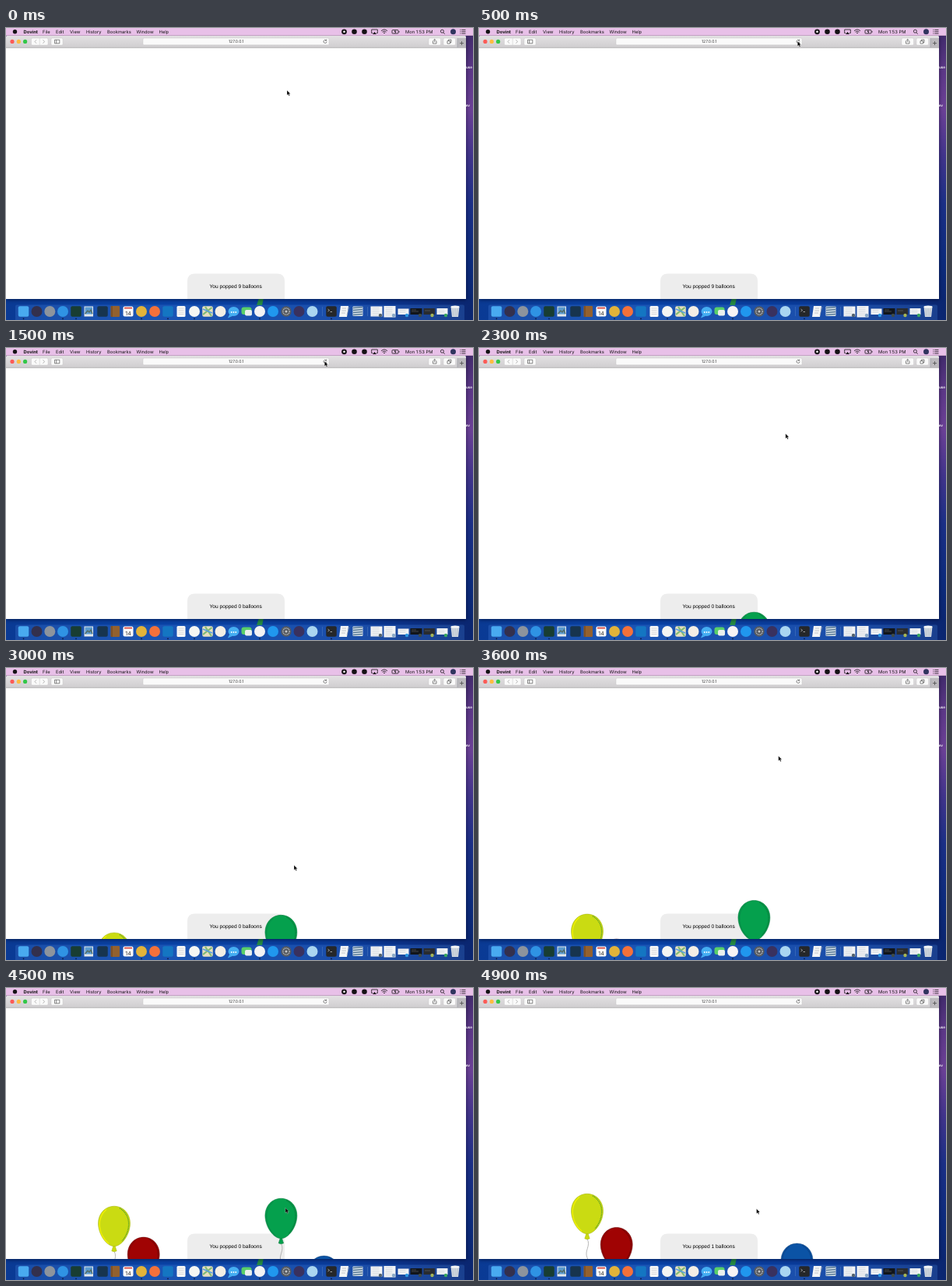
An HTML page for the animation above (5 s loop, 600 by 375 pixels).

```html
<!DOCTYPE html>
<html lang="en">
<head>
<meta charset="utf-8">
<title>Balloon game</title>
<style>
html, body { margin: 0; width: 100%; height: 100%; overflow: hidden; }
svg { display: block; width: 100vw; height: 100vh; }
text { font-family: Inter, "Open Sans", sans-serif; text-rendering: geometricPrecision; }
.page { font-family: "Liberation Sans", Arial, sans-serif; }
.window { filter: drop-shadow(0 1px 2.5px rgba(0, 0, 20, .55)); }
</style>
</head>
<body>
<svg viewBox="0 0 600 375" preserveAspectRatio="none">
  <defs>
    <linearGradient id="wall" x2="0" y2="1">
      <stop offset="0" stop-color="#3c2866"/>
      <stop offset=".14" stop-color="#5b3786"/>
      <stop offset=".28" stop-color="#6b4096"/>
      <stop offset=".44" stop-color="#40348b"/>
      <stop offset=".6" stop-color="#1b2f86"/>
      <stop offset=".8" stop-color="#0c2b7c"/>
      <stop offset="1" stop-color="#0a246c"/>
    </linearGradient>
    <linearGradient id="floor">
      <stop offset="0" stop-color="#0a3a94"/>
      <stop offset=".35" stop-color="#0a43a6"/>
      <stop offset=".75" stop-color="#0a3a98"/>
      <stop offset="1" stop-color="#0b2670"/>
    </linearGradient>
    <linearGradient id="bar" x2="0" y2="1">
      <stop offset="0" stop-color="#e3e1e3"/>
      <stop offset="1" stop-color="#cfcdcf"/>
    </linearGradient>
    <clipPath id="view"><rect y="25" width="591" height="323"/></clipPath>
  </defs>
  <rect width="600" height="375" fill="url(#wall)"/>
  <rect y="347" width="600" height="28" fill="url(#floor)"/>
  <path d="M322 356L325 347H331L329 356Z" fill="#258b43"/>
  <rect class="window" y="10" width="591" height="338" rx="2" fill="#fff"/>
  <g fill="#fff" font-size="4.6" font-weight="600" text-anchor="end" clip-path="inset(0)">
    <text x="599" y="52">ause</text><text x="596" y="101">dev</text>
  </g>
  <rect y="25" width="591" height="323" fill="#fff"/>

  <rect y="9" width="600" height="1" fill="#a98ca9"/>
  <rect width="600" height="9.4" fill="#e8c0e8"/>
  <g id="menu" font-size="5.8" fill="#111"></g>
  <g id="status" fill="#151215" stroke="#151215" stroke-width="0">
    <circle cx="11.5" cy="4.7" r="2.7"/>
    <circle cx="434.5" cy="4.8" r="3.4"/><circle cx="434.5" cy="4.8" r="1.3" fill="#fff"/>
    <circle cx="447.5" cy="4.8" r="3.3"/><circle cx="460.5" cy="4.8" r="3.3"/>
    <path d="M471 6.5H469.7V2H477.3V6.5H476" fill="none" stroke-width=".8"/>
    <path d="M473.5 5L476 8H471Z"/>
    <g fill="none" stroke-width=".8">
      <path d="M482 3.7Q486 .3 490 3.7M483.5 5.2Q486 3 488.5 5.2M485 6.6Q486 5.8 487 6.6"/>
      <rect x="496" y="2.6" width="8" height="4.4" rx=".8"/>
      <path d="M505 4V5.6"/>
      <circle cx="560.4" cy="4.2" r="2"/><path d="M561.9 5.8L563.7 7.7"/>
      <path d="M583.4 2.4H584.4M585.4 2.4H590.5M583.4 4.7H584.4M585.4 4.7H590.5M583.4 7H584.4M585.4 7H590.5"/>
    </g>
    <path d="M500.5 2L498.6 5H500L499.6 7.6L501.6 4.5H500.2Z"/>
    <circle cx="574.5" cy="4.7" r="3.5" fill="#30345e"/>
  </g>

  <path d="M0 25.5V12Q0 10 2 10H589Q591 10 591 12V25.5Z" fill="url(#bar)"/>
  <path d="M0 25.3H591" stroke="#aaa8aa" stroke-width=".7"/>
  <rect x="580" y="13" width="11" height="12" fill="#bbb9bd"/>
  <path d="M580 13V25" stroke="#989ba6" stroke-width=".6"/>
  <g id="lights"></g>
  <g fill="#fafafa" stroke="#c2c0c2" stroke-width=".4">
    <rect x="32.5" y="13" width="21.5" height="9" rx="1.5"/>
    <rect x="58" y="13" width="15" height="9" rx="1.5"/>
    <rect x="176" y="13" width="239" height="8.8" rx="1.5"/>
    <rect x="543" y="13" width="15.5" height="9" rx="1.5"/>
    <rect x="562" y="13" width="15.5" height="9" rx="1.5"/>
  </g>
  <g fill="none" stroke="#555" stroke-width=".7">
    <path d="M39 15.3L37 17.5L39 19.7M47.5 15.3L49.5 17.5L47.5 19.7" stroke="#999"/>
    <path d="M43.2 13V22" stroke="#d5d5d5"/>
    <path d="M62.5 15.2H68.8V19.8H62.5ZM64.7 15.2V19.8"/>
    <path d="M549.2 16.7H548.5V20H553V16.7H552.3M550.7 18.3V14.5M549.4 15.7L550.7 14.4L552 15.7"/>
    <path d="M567 16.6H570.5V20H567ZM568.5 16.6V15H572V18.6H570.5"/>
    <path d="M411.4 15.9A2 2 0 1 0 412 17.6M411.7 14.6V16.2H410"/>
    <path d="M583 19.5H588M585.5 17V22" stroke="#444"/>
  </g>
  <text x="295.7" y="19.4" font-size="5.1" fill="#333" text-anchor="middle">127.0.0.1</text>

  <g clip-path="url(#view)">
    <path d="M233 348V325Q233 315.5 242.5 315.5H348.5Q358 315.5 358 325V348Z" fill="#ededed"/>
    <text id="score" class="page" x="261.5" y="333.7" font-size="6.65"></text>
    <g id="balloons"></g>
  </g>

  <rect x="12" y="355.5" width="577" height="22" rx="2" fill="#4a86e0" fill-opacity=".25"/>
  <g id="dock"></g>
  <path id="cursor" d="M0 0V6.3L1.5 5L2.5 7.3L3.6 6.8L2.6 4.6H4.5Z" fill="#000" stroke="#fff" stroke-width=".3"/>
</svg>
<script>
const NS = "http://www.w3.org/2000/svg";
const LOOP = 5000, STEP = 100, RELOAD = 900, POP = 4700;
const $ = id => document.getElementById(id);

function add(parent, tag, attrs, text) {
  const el = document.createElementNS(NS, tag);
  for (const key in attrs) el.setAttribute(key, attrs[key]);
  if (text) el.textContent = text;
  parent.appendChild(el);
  return el;
}

// Menu bar and window buttons
[["Dovint", 22.5], ["File", 47], ["Edit", 64], ["View", 82], ["History", 103],
 ["Bookmarks", 130], ["Window", 167.5], ["Help", 196.5], ["Mon 1:53 PM", 513]]
  .forEach(([label, x], i) =>
    add($("menu"), "text", { x, y: 6.8, "font-weight": i ? 400 : 700 }, label));
["#fc5b57", "#fdbc40", "#33c748"].forEach((fill, i) =>
  add($("lights"), "circle", { cx: 8 + i * 8.3, cy: 17.4, r: 2.6, fill }));

// Dock
const dock = $("dock");
const box = (x, y, width, height, fill, rx = 0) =>
  add(dock, "rect", { x, y, width, height, fill, rx });
const disc = (cx, r, fill) => add(dock, "circle", { cx, cy: 364, r, fill });
const line = (d, stroke, width = 0.6) =>
  add(dock, "path", { d, stroke, "stroke-width": width, fill: "none" });
const tile = (cx, fill, size = 13.5) =>
  box(cx - size / 2, 364 - size / 2, size, size, fill, 2);

[[39.5, "#33304d"], [56.3, "#8d949d"], [73, "#2f93e4"], [174, "#e2b33a"],
 [191, "#f4713a"], [242, "#f4f6f3"], [275.5, "#f3eee5"], [326, "#f5f3f4"],
 [343, "#2097ee"], [376.5, "#39315f"], [393.5, "#a9d5f0"]]
  .forEach(([x, fill]) => disc(x, 7, fill));
[[22.5, "#49aaf0"], [90, "#183d32"], [124, "#17344e"], [208, "#1476c2"]]
  .forEach(([x, fill]) => tile(x, fill));

// Picture viewer
box(100.5, 357.5, 11.5, 13, "#e3e8eb");
box(101.5, 358.5, 9.5, 9, "#5b9bd0");
line("M101.5 367L105 363L107 365L109 362L111 367", "#566d64", 1.4);
// Address book
box(134.5, 357, 11.5, 14, "#93612f", 1);
line("M136 357V371", "#6c421b", 1);
// Calendar
tile(157, "#fafafa", 13);
line("M152 359.6H162", "#d94b42", 1.8);
add(dock, "text", { x: 157, y: 368.5, "font-size": 7, "text-anchor": "middle", fill: "#333" }, "14");
// Notes
box(219.5, 357, 11, 14, "#f7f7f7", 1.5);
for (let y = 360; y < 370; y += 2.5) line(`M221.5 ${y}H228.5`, "#b2b5ba", 0.5);
// Map
tile(259, "#e6dfbd");
line("M253 368L264.5 359M256 358L264 370", "#7fba75", 2.2);
line("M253 361L265 366", "#5a9ede", 1.6);
// Chat bubbles
add(dock, "ellipse", { cx: 292.5, cy: 364, rx: 7, ry: 6, fill: "#45aef2" });
line("M288 368L286.5 371L291 369", "#45aef2", 1.5);
[289.7, 292.5, 295.3].forEach(cx => add(dock, "circle", { cx, cy: 365, r: 0.9, fill: "#fff" }));
box(302.5, 358.5, 13, 9.5, "#59cf69", 3);
box(307, 362, 9, 7.5, "#e9efec", 2);
// Gear
disc(360, 6.7, "#55595f");
add(dock, "circle", { cx: 360, cy: 364, r: 4.2, fill: "none", stroke: "#b9bec4",
  "stroke-width": 1.3, "stroke-dasharray": "1.2 .7" });
disc(360, 1.5, "#c3c6ca");
line("M406.5 358V370M464.5 358V370", "#4776be", 0.6);
// Terminal
tile(418, "#252729");
line("M413.5 361L415.5 362.5L413.5 364M416.5 364.5H419", "#eee");
// Documents
add(dock, "path", { d: "M430 357H440L438 371H428Z", fill: "#f4f5f6" });
line("M432 360H437M431.5 363H437M431 366H436M438 369L441 358", "#9ea5ac");
box(445.5, 357.5, 13, 12.5, "#d8e2e9", 1);
for (let y = 359.5; y < 370; y += 3) line(`M446 ${y}L458 ${y - 1}`, "#587a96", 1.3);
[[468.5, 357.5, 15, 13], [485.5, 357, 15, 14.5], [503.5, 360.5, 14, 7.5], [553.5, 360, 14, 8]]
  .forEach(([x, y, w, h]) => {
    box(x, y, w, h, "#f1f3f5");
    for (let k = y + 2; k < y + h - 1; k += 2.4) line(`M${x + 2} ${k}H${x + w - 4}`, "#b7bec6", 0.5);
  });
box(519.5, 360, 15, 8, "#11151a");
box(536.5, 360, 14.5, 8, "#292c30");
line("M521 362H527M521 364H530M538 363H545", "#777", 0.5);
[[481, "#52616d"], [498, "#8ba9c6"], [515, "#2d98e3"], [532, "#3f4b48"], [547.5, "#a5b456"], [565, "#38a65f"]]
  .forEach(([cx, fill]) => add(dock, "circle", { cx, cy: 369, r: 2.2, fill }));
// Bin
add(dock, "path", { d: "M571.5 358H582.5L581 371H573Z", fill: "#d5dce3" });
add(dock, "ellipse", { cx: 577, cy: 358, rx: 5.5, ry: 1.5, fill: "#f5f6f6" });
line("M574 360L574.7 370M577 360V370M580 360L579.3 370", "#9ca9b6");
[22.5, 73, 90, 174, 208, 242, 326, 418].forEach(cx =>
  add(dock, "circle", { cx, cy: 373.4, r: 0.8, fill: "#071638" }));

// Balloons: centre, top edge at 4500 ms, speed in px/s, colours
const SKIN = "M0 0C12 0 20.5 10 20.5 22C20.5 36 10 51.5 0 51.5S-20.5 36-20.5 22C-20.5 10-12 0 0 0Z";
const balloons = [
  [139, 280.2, 39.8, "#cadb12", "#a3b20c", "#f0f000", "#5d9e28"],
  [176.7, 320, 31.2, "#a00303", "#5b0505", "#8a0505", "#6b0000"],
  [353.4, 270.2, 31.4, "#05a04d", "#08743b", "#07904a", "#087a3b"],
  [408.5, 344, 40, "#0b53a5", "#083a75", "#0b488f", "#083f82"]
].map(([x, top, speed, fill, edge, light, shade]) => {
  const node = add($("balloons"), "g", {});
  add(node, "path", { d: "M0 58C5 67-4 73 0 82S-2 94 0 104", fill: "none", stroke: "#999", "stroke-width": 0.7 });
  add(node, "path", { d: "M-.8 50H.8L3.2 57.5Q0 59.2-3.2 57.5Z", fill, stroke: edge, "stroke-width": 0.5 });
  add(node, "path", { d: SKIN, fill, stroke: edge, "stroke-width": 0.5 });
  add(node, "path", { d: "M-10 4C-24 16-20 37-7 48", fill: "none", stroke: light, "stroke-width": 1.3 });
  add(node, "path", { d: "M7 2.5C22 11 22 31 10 45", fill: "none", stroke: shade,
    "stroke-width": 1.4, "stroke-dasharray": "1.3 .8" });
  return { node, x, top, speed };
});

// Pointer stops: time, x, y
const stops = [[0, 361, 80], [400, 409.3, 17], [2000, 409.3, 17], [2700, 370, 253.2],
  [3000, 370, 253.2], [3600, 384.7, 113], [4300, 359, 282.5], [4500, 359, 282.5],
  [4900, 356.5, 283.5], [5000, 356.5, 283.5]];

function pointer(t) {
  const i = stops.findIndex(s => s[0] > t);
  const [t0, x0, y0] = stops[i - 1], [t1, x1, y1] = stops[i];
  const p = (t - t0) / (t1 - t0), e = p * p * (3 - 2 * p);
  return [x0 + (x1 - x0) * e, y0 + (y1 - y0) * e];
}

function draw(t) {
  const count = t < RELOAD ? 9 : t < POP ? 0 : 1;
  $("score").textContent = `You popped ${count} balloons`;
  balloons.forEach(({ node, x, top, speed }, i) => {
    const y = top - speed * (t - 4500) / 1000;
    const shown = t >= RELOAD && !(i === 2 && t >= POP);
    node.setAttribute("transform", `translate(${x} ${y})`);
    node.setAttribute("visibility", shown ? "visible" : "hidden");
  });
  $("cursor").setAttribute("transform", `translate(${pointer(t)})`);
}

function tick(now) {
  draw(Math.floor(now % LOOP / STEP) * STEP);
  requestAnimationFrame(tick);
}
draw(0);
requestAnimationFrame(tick);
</script>
</body>
</html>
```
